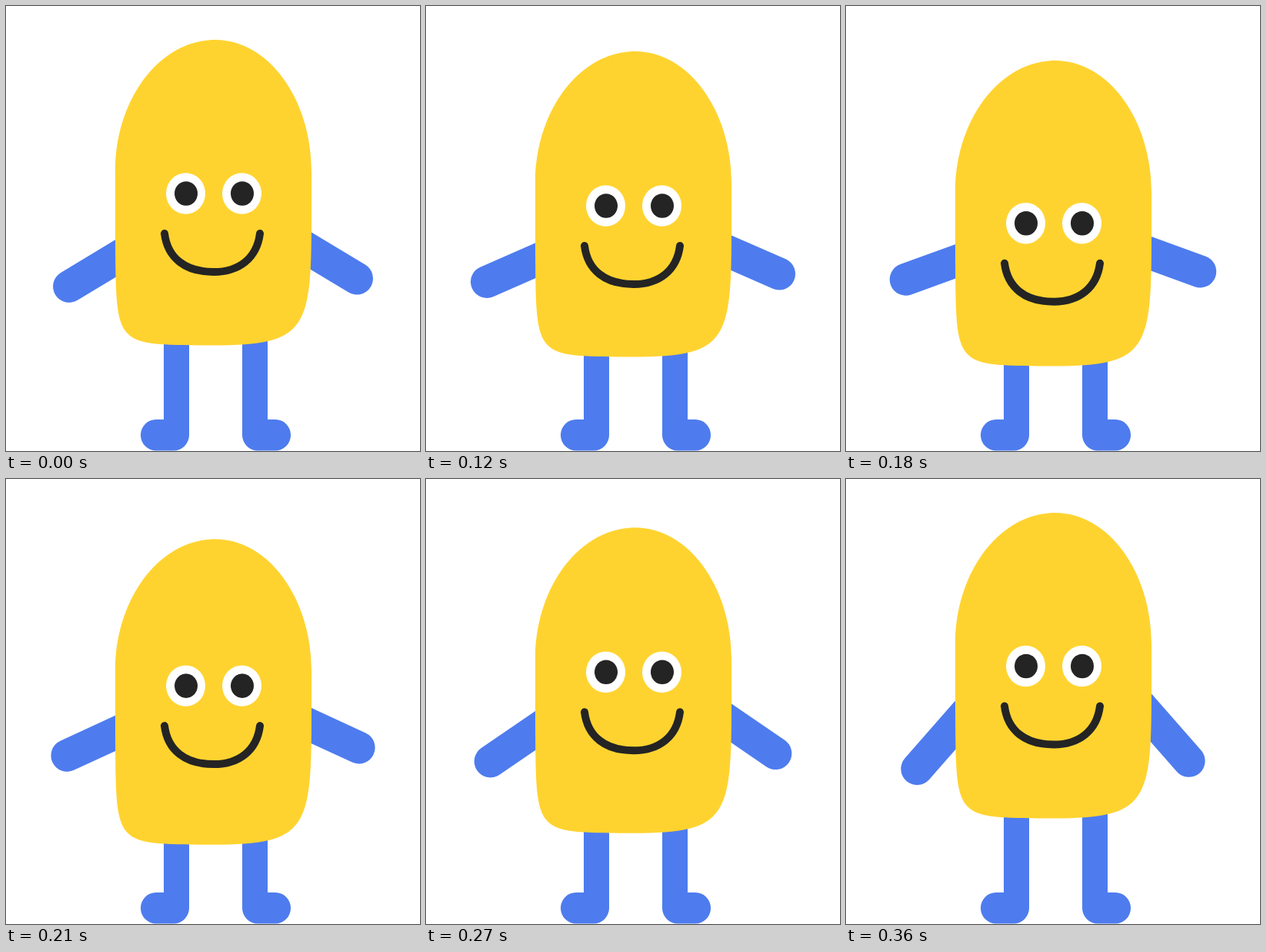
An HTML page that plays this animation: 538x579 px, repeating every 0.45 s.

```html
<!DOCTYPE html>
<html lang="en">
<head>
<meta charset="utf-8">
<title>Bouncing character</title>
<style>
  html, body { margin: 0; width: 100%; height: 100%; overflow: hidden; background: #fff; }
  svg { display: block; }
</style>
</head>
<body>
<svg width="538" height="579" viewBox="0 0 538 579">
  <defs>
    <path id="leg" d="M205 400H238V558A20 20.3 0 0 1 218 578.5H195A20 20.2 0 0 1 195 538H205Z"/>
    <g id="eye">
      <ellipse rx="25.5" ry="26.7" fill="#fff"/>
      <ellipse cx=".5" rx="15" ry="15.8" fill="#242424"/>
    </g>
  </defs>
  <g fill="#4e7cee">
    <use href="#leg"/>
    <use href="#leg" transform="matrix(-1 0 0 1 545 0)"/>
  </g>
  <g stroke="#4e7cee" stroke-width="42" stroke-linecap="round">
    <path id="leftArm" d="M-52 0H45"/>
    <path id="rightArm" d="M52 0H-45"/>
  </g>
  <path id="torso" fill="#ffd32f" d="M142 215C142 121 200 44 272 44C341 44 397 121 397 215V270C397 420 393 441.5 270 441.5H250C140 440 143 440 142 300Z"/>
  <g id="face">
    <use href="#eye" x="233.5" y="244"/>
    <use href="#eye" x="306.5" y="244"/>
    <path d="M206 296C210 328 233 346 270 346C303 346 326 328 330 296" fill="none" stroke="#242424" stroke-width="10" stroke-linecap="round"/>
  </g>
</svg>
<script>
  const LOOP = 450, STEP = 30, MOVE = 360;
  const place = (id, transform) =>
    document.getElementById(id).setAttribute('transform', transform);

  // k runs from 0 to 6 over the move; the remaining time is a hold
  const torsoDrop = k => {
    const left = 6 - k;
    return k <= 3.5 ? 4.5 * k + 1.5 * k * k : 5.75 * left + 4.75 * left * left;
  };
  const faceDrop = k => k < 3
    ? 9.83 * k - 4.75 * k ** 2 + 1.917 * k ** 3
    : 3 * (6 - k) ** 2.34 - 0.5;
  const armAngle = k => k < 3 ? 31.1 - 3.7 * k : 20 + 9.6 * (k - 3);

  function draw(now) {
    const time = Math.min(Math.floor(now % LOOP / STEP) * STEP, MOVE);
    const k = time / 60;
    const angle = armAngle(k);
    place('torso', `translate(0 ${torsoDrop(k)})`);
    place('face', `translate(0 ${faceDrop(k)})`);
    place('leftArm', `translate(126.6 338) rotate(${-angle})`);
    place('rightArm', `translate(411.4 327.7) rotate(${angle})`);
  }

  const start = performance.now();
  function tick() {
    draw(performance.now() - start);
    requestAnimationFrame(tick);
  }
  tick();
</script>
</body>
</html>
```
